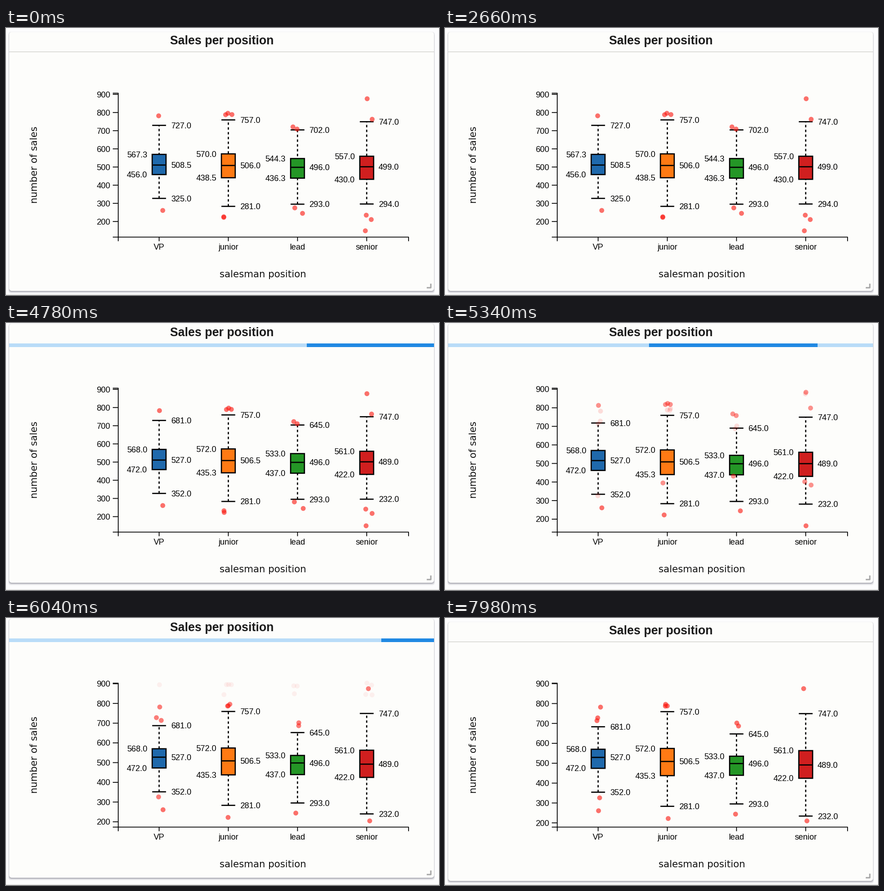
Write a matplotlib script that moves like this. It is 953 by 588 pixels and loops after 8 s.

```python
import numpy as np
import matplotlib.pyplot as plt
from matplotlib.animation import FuncAnimation
from matplotlib.collections import LineCollection
from matplotlib.patches import FancyBboxPatch, Rectangle
from matplotlib.transforms import Affine2D

W, H, DPI = 953, 588, 64
PT = 72 / DPI
LOOP, TICK = 8000, 20
INK = "#111111"
ZOOM = 1.76                                    # page zoom of the chart

JITTER, LOAD, DATA, DONE = 58, 83, 97, 144
SPAN = 46.5                                    # length of a chart transition
TOP = 142

rng = np.random.default_rng(4)
fig = plt.figure(figsize=(W / DPI, H / DPI), dpi=DPI, facecolor="#fcfcfd")
ax = fig.add_axes([0, 0, 1, 1])
ax.set_xlim(0, W)
ax.set_ylim(H, 0)
ax.axis("off")

lift = Affine2D()
card_space = lift + ax.transData


def text(x, y, s, px=10 * ZOOM * 1.02, font="Liberation Sans", color="black", **kw):
    return ax.text(x, y, s, fontsize=px * PT, family=font, color=color, va="baseline", **kw)


def lines(segments, color="black", width=ZOOM, **kw):
    group = LineCollection(segments, colors=color, linewidths=width * PT, snap=False, **kw)
    ax.add_collection(group, autolim=False)
    return group


def mix(a, b, p):
    return a + (b - a) * p


def cubic(t):
    t = min(max(t, 0), 1)
    return 4 * t ** 3 if t < 0.5 else 1 - (2 - 2 * t) ** 3 / 2


S = np.linspace(0, 1, 200)
EASE_X = 0.75 * S * (1 - S) + S ** 3
EASE_Y = 0.3 * S * (1 - S) ** 2 + 3 * S ** 2 * (1 - S) + S ** 3


def css_ease(t):
    return np.interp(t, EASE_X, EASE_Y)


def old_y(v):
    return 506.2 - 0.4 * v


def new_y(v):
    return 538.8 - 0.438 * v


# card with a soft shadow
def rounded(x, y, w, h, color, alpha=1.0, z=0.0):
    box = FancyBboxPatch((x + 6, y + 6), w - 12, h - 12, boxstyle="round,pad=6",
                         facecolor=color, edgecolor="none", alpha=alpha, zorder=z)
    box.set_transform(card_space)
    ax.add_patch(box)


for grow in range(4, -1, -1):
    rounded(7 - grow / 2, 12 - grow, 935 + grow, 568.5 + 2 * grow, "#505064",
            0.25 / (1 + grow))
rounded(7, 9, 935, 570, "#fdfdfb", z=0.1)
lines([[(0, 587.3), (W, 587.3)]], "#d8d8d4", 1)

title = text(475, 36, "Sales per position", 26.5, weight="bold", ha="center", color="#1c1c1c")
title.set_transform(card_space)
rule = lines([[(7, 52.5), (942, 52.5)]], "#cacac6", 1.2, transform=card_space)
lines([[(935, 563), (935, 572), (926, 572)]], "#a6a6a6", 3, transform=card_space)

# progress bar
track = ax.add_patch(Rectangle((7, 45), 935, 8, color="#b9dcf8", lw=0, zorder=3))
runner = ax.add_patch(Rectangle((7, 45), 0, 8, color="#2089e3", lw=0, zorder=3.1))

# axes
text(565.5, 549, "salesman position", 21.1, "DejaVu Sans", INK, ha="center")
text(69, 301, "number of sales", 21.1, "DejaVu Sans", INK, ha="center",
     rotation=90, rotation_mode="anchor")
NAMES = ("VP", "junior", "lead", "senior")
CENTERS = [337 + 152.3 * i for i in range(len(NAMES))]
lines([[(235, 143.5), (247, 143.5), (247, 460.5), (235, 460.5)],
       [(247, 469.5), (247, 460.5), (886, 460.5), (886, 469.5)]]
      + [[(x, 460.5), (x, 469.5)] for x in CENTERS])
for x, name in zip(CENTERS, NAMES):
    text(x, 488, name, ha="center")

TICKS = range(200, 901, 100)
tick_marks = lines([])
tick_labels = [text(229.5, 0, str(v), ha="right") for v in TICKS]


class Box:
    """One box plot: low, q1, median, q3, high before and after the update."""

    HALF, PEN = 15.2, 1.5 * ZOOM

    def __init__(self, x, color, before, after):
        self.x, self.before, self.after = x, np.array(before), np.array(after)
        pen = self.PEN * PT
        self.stem = ax.plot([x, x], [0, 0], color="black", lw=pen, zorder=2,
                            dashes=(2, 2), dash_capstyle="butt", snap=False)[0]
        self.rect = ax.add_patch(Rectangle((x - self.HALF, 0), 2 * self.HALF, 0, fc=color,
                                           ec="black", lw=pen, zorder=2.1, snap=False))
        self.bars = lines([], width=self.PEN, zorder=2.2)
        self.labels = [text(x - 26, 0, "", ha="right") if i in (1, 3) else text(x + 26, 0, "")
                       for i in range(5)]

    def update(self, p, updated):
        ys = mix(old_y(self.before), new_y(self.after), p) - 1
        self.stem.set_ydata([ys[0], ys[4]])
        self.rect.set_y(ys[3])
        self.rect.set_height(ys[1] - ys[3])
        ends = self.x - self.HALF, self.x + self.HALF
        self.bars.set_segments([[(end, ys[i]) for end in ends] for i in (0, 2, 4)])
        for label, y, v in zip(self.labels, ys, self.after if updated else self.before):
            label.set_y(y + 6.4)
            label.set_text(f"{v:.1f}")


BOXES = [
    Box(CENTERS[0], "#1f69ac", (325, 456, 508.5, 567.3, 727), (352, 472, 527, 568, 681)),
    Box(CENTERS[1], "#ff7a14", (281, 438.5, 506, 570, 757), (281, 435.3, 506.5, 572, 757)),
    Box(CENTERS[2], "#249626", (293, 436.3, 496, 544.3, 702), (293, 437, 496, 533, 645)),
    Box(CENTERS[3], "#d01f1f", (294, 430, 499, 557, 747), (232, 422, 489, 561, 747)),
]

# outliers per position: value -> sideways offset, then the values after the update
OUTLIERS = [
    ({782: -1, 261: 8}, (728, 714, 782, 326, 261)),
    ({788: -6, 796: -1, 789: 8, 226: -10, 223: -10}, (796, 788, 787, 222)),
    ({721: -10, 709: -1, 275: -6, 245: 11}, (702, 687, 244)),
    ({876: 1, 763: 12, 235: -1, 211: 10, 149: -3}, (875, 210)),
]


def scatter_paths():
    """Rows of four x, start and end y, start and end opacity."""
    rows = []
    for cx, (first, values) in zip(CENTERS, OUTLIERS):
        *gone, kept = [(cx + dx, cx + dx + rng.uniform(-2, 2), old_y(v))
                       for v, dx in first.items()]
        *fresh, last = values
        spot = lambda: cx + rng.uniform(-9, 9)
        rows += [(x0, x1, x1, x1, y, TOP, 1, 0) for x0, x1, y in gone]
        rows += [(x, x, spot(), spot(), old_y(v), new_y(v), 0, 1)
                 for v in fresh for x in [spot()]]
        rows.append((*kept[:2], spot(), spot(), kept[2], new_y(last), 1, 1))
    return np.array(rows).T


PATHS = scatter_paths()
count = PATHS.shape[1]
dots = ax.scatter(np.zeros(count), np.zeros(count), s=(6.1 * ZOOM * PT) ** 2, lw=0, zorder=4)


def place_dots(n, p):
    x0, x1, x2, x3, y0, y1, a0, a1 = PATHS
    x = (mix(x0, x1, cubic((n - JITTER) / SPAN)) + (x2 - x1) * p
         + (x3 - x2) * cubic((n - DONE) / SPAN))
    dots.set_offsets(np.column_stack([x, mix(y0, y1, p)]))
    dots.set_facecolors([(0.98, 0.1, 0.07, 0.62 * a) for a in mix(a0, a1, p)])


def place_bar(n):
    loading = LOAD <= n < DONE
    lift.clear()
    if loading:
        lift.translate(0, -7)
    rule.set_visible(not loading)
    track.set_visible(loading)
    runner.set_visible(loading)
    # a short sweep, then a long one, every 2.2 s of page time
    clock = np.interp(n, [LOAD - 0.25, 115, DONE], [0, 2.864, 5.3]) % 2.2
    if clock < 1.32:
        p = css_ease(clock / 1.32)
        ends = -2 + 3.07 * p, 1.08 * p
    else:
        p = css_ease((clock - 1.32) / 0.88)
        ends = -0.9 + 1.9 * p, 1.35 * p
    left, right = np.clip(ends, 0, 1)
    runner.set_x(7 + 935 * left)
    runner.set_width(935 * (right - left))


def step_at(ms):
    """Steps last 20, 100 and 20 ms in turn."""
    turn, rest = divmod(ms, 140)
    return 3 * turn + (rest >= 20) + (rest >= 120)


def update(i):
    n = step_at(i * TICK)
    p = cubic((n - DATA) / SPAN)
    ys = [mix(old_y(v), new_y(v), p) for v in TICKS]
    tick_marks.set_segments([[(235, y), (247, y)] for y in ys])
    for label, y in zip(tick_labels, ys):
        label.set_y(y + 6.4)
    for box in BOXES:
        box.update(p, n >= DATA)
    place_dots(n, p)
    place_bar(n)
    return []


anim = FuncAnimation(fig, update, frames=LOOP // TICK, interval=TICK,
                     init_func=lambda: update(0), repeat=True, repeat_delay=0)
plt.show()
```
